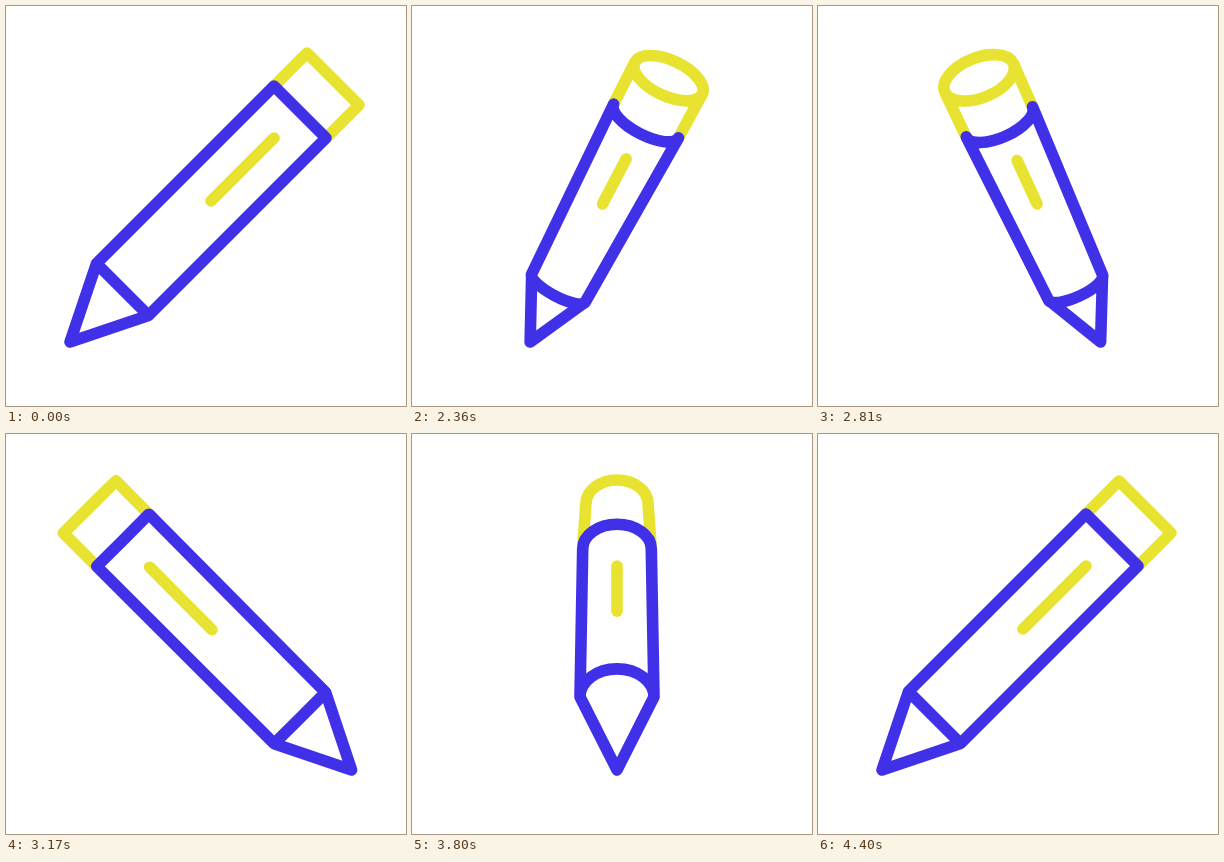
An HTML page that plays this animation: 400 by 400 pixels, repeating every 4430 ms.

```html
<!DOCTYPE html>
<html lang="en">
<head>
<meta charset="utf-8">
<title>Turning pencil</title>
<style>
html, body { margin: 0; width: 100%; height: 100%; overflow: hidden; background: #fff; }
svg { display: block; width: 100%; height: 100%; }
path { fill: none; stroke-width: 11.6; stroke-linecap: round; stroke-linejoin: round; }
.yellow { stroke: #e8e230; }
.blue { stroke: #4030e8; }
</style>
</head>
<body>
<svg viewBox="0 0 400 400">
  <path id="eraser" class="yellow"/>
  <path id="shine" class="yellow"/>
  <path id="body" class="blue"/>
</svg>
<script>
const LOOP = 4430, HOLD = 2030, STEP = 30, TURN = 2400;
const MID = 205, TIP_Y = 336, K = 0.5523;
const el = id => document.getElementById(id);
const add = (p, q, k = 1) => [p[0] + q[0] * k, p[1] + q[1] * k];
const pt = p => p[0].toFixed(2) + ' ' + p[1].toFixed(2);
const line = (...ps) => 'M' + ps.map(pt).join('L');

// Half ellipse from c - h to c + h, bulging along v.
function arc(c, h, v) {
  const a = add(c, h, -1), b = add(c, h), top = add(c, v);
  return 'C' + [add(a, v, K), add(top, h, -K), top,
                add(top, h, K), add(b, v, K), b].map(pt).join(' ');
}

function draw(angle) {
  const c = Math.cos(angle), s = Math.sin(angle), s2 = s * s;
  const slope = c * (1 - 0.165 * s2);
  const len = Math.hypot(slope, 1);
  const axis = [slope / len, -1 / len];
  const tip = [MID - 141 * c - 10.3 * c * s2, TIP_Y];
  const front = s > 0;

  // Quadratic in s: value when flat, plus the effect of depth.
  const q = (base, a, b) => base + a * s + b * s2;
  const onAxis = rise => [tip[0] + slope * rise, TIP_Y - rise];
  function ring(rise, hx, hy, bulge) {
    const mid = onAxis(rise), h = [hx, 26 * c * hy];
    const v = [axis[0] * bulge, axis[1] * bulge];
    return { mid, h, v, l: add(mid, h, -1), r: add(mid, h) };
  }

  const end = ring(263 + 3 * s2 ** 3, q(26, 2.9, 8), q(1, 0.07, 0),
                   front ? 27.5 * s2 : 24 * Math.abs(s) ** 2.5);
  const band = ring(q(230, -2.2, -11), q(26, 0.7, 9), q(1, 0.06, 0.08),
                    front ? -21.5 * s2 : 24.5 * s2);
  const neck = ring(q(52.5, -8.2, 12.4), q(26, -4.4, 6.6), q(1, -0.135, 0.05),
                    front ? -13 * s2 : 28 * s2);
  const bow = (o, k = 1) => 'M' + pt(o.l) + arc(o.mid, o.h, [o.v[0] * k, o.v[1] * k]);

  el('eraser').setAttribute('d',
    line(band.l, end.l) + arc(end.mid, end.h, end.v) + 'L' + pt(band.r) +
    (front ? bow(end, -1) : ''));
  el('body').setAttribute('d',
    bow(band) + 'L' + pt(neck.r) + 'L' + pt(tip) + 'L' + pt(neck.l) + 'Z' + bow(neck));
  el('shine').setAttribute('d',
    line(onAxis(q(204, -14.3, -14.3)), onAxis(q(141, -10, 7.8))));
}

function frame(now) {
  const t = now % LOOP;
  const steps = t < HOLD ? 0 : Math.floor((t - HOLD) / STEP) + 1;
  draw(2 * Math.PI * steps * STEP / TURN);
  requestAnimationFrame(frame);
}
const start = performance.now();
draw(0);
requestAnimationFrame(function first() {
  frame(Math.max(0, performance.now() - start));
});
</script>
</body>
</html>
```
